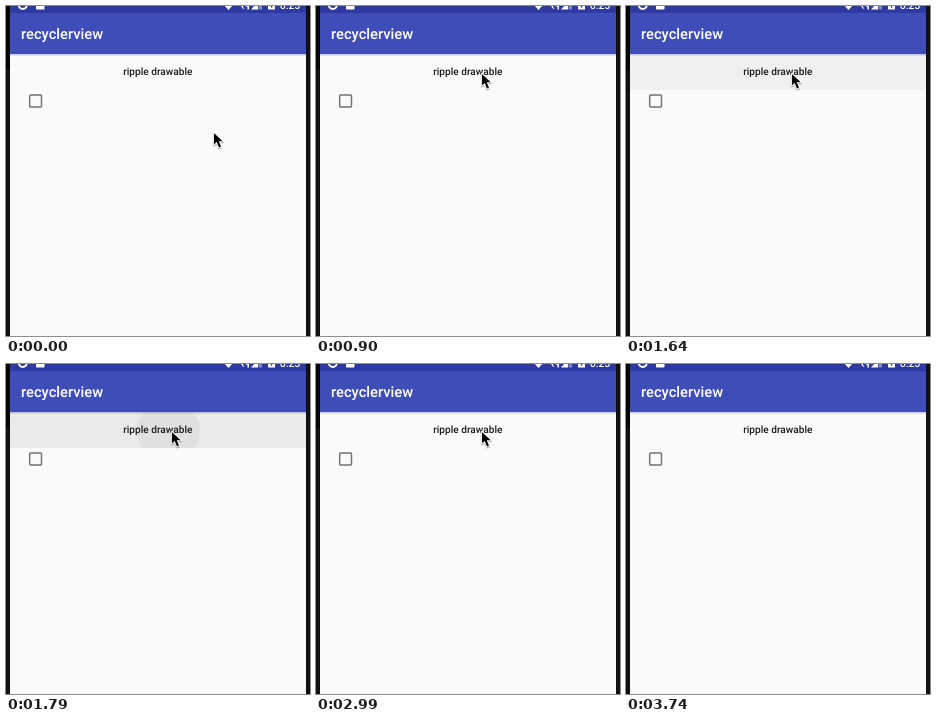
An HTML page that plays this animation: 304 by 330 pixels, repeating every 3890 ms.

```html
<!DOCTYPE html>
<html lang="en">
<head>
<meta charset="utf-8">
<title>Ripple drawable</title>
<style>
  html, body { margin: 0; width: 100%; height: 100%; overflow: hidden; background: #fafafa; }
  svg { display: block; width: 304px; height: 330px; }
  text { font-family: Roboto, sans-serif; font-weight: 500; text-rendering: geometricPrecision; }
  #cursor { filter: drop-shadow(0 1px .7px rgba(0, 0, 0, .35)); }
</style>
</head>
<body>
<svg viewBox="0 0 304 330">
  <defs>
    <linearGradient id="shade" x2="0" y2="1">
      <stop offset="0" stop-color="#000" stop-opacity=".22"/>
      <stop offset="1" stop-color="#000" stop-opacity="0"/>
    </linearGradient>
    <clipPath id="rowClip"><rect x="4" y="48" width="296" height="36"/></clipPath>
  </defs>

  <rect width="304" height="330" fill="#fafafa"/>

  <g clip-path="url(#rowClip)">
    <rect id="row" x="4" y="48" width="296" height="36"/>
    <circle id="ripple" cx="162.3" cy="67"/>
  </g>
  <text x="151.8" y="69.3" font-size="10.1" text-anchor="middle" fill="#1c1c1c">ripple drawable</text>
  <rect x="23.7" y="89.1" width="11.8" height="11.8" rx=".8" fill="none" stroke="#737373" stroke-width="1.5"/>

  <rect x="4" y="48" width="296" height="2.5" fill="url(#shade)"/>
  <rect x="4" width="296" height="48" fill="#3f4db8"/>
  <rect x="4" width="296" height="7" fill="#2e3aa2"/>
  <text x="15" y="32.8" font-size="14.7" fill="#fff">recyclerview</text>

  <g fill="#fff">
    <circle cx="16.8" cy="-1" r="4" fill="none" stroke="#fff" stroke-width="2"/>
    <rect x="30" y="-4" width="8.5" height="7.5" rx=".8"/>
    <path d="M217 -2H228L222.5 4Z"/>
    <path d="M235 -2H237V1L238.5 2.8H237L235 0ZM239 0L243 -2V3.5H241.5V1Z"/>
    <path d="M245 3.5L252 -4V3.5Z"/>
    <path d="M252.6 -3H256V3.5H252.6Z" opacity=".4"/>
    <path d="M262 -4H269V3.5H262Z"/>
    <path d="M264.8 0H266.3V1.6H264.8Z" fill="#2e3aa2"/>
    <text x="273.8" y="3" font-size="10.4">6:25</text>
  </g>

  <path d="M0 0H4V330H0ZM300 0H304V330H300Z" fill="#111012"/>
  <path d="M0 0H4V64H0Z" fill="#060607"/>

  <path id="cursor" d="M1.4 2V13.6L4.2 10.9L6.5 16.4L8.5 15.6L6.2 10.2H10.2Z"
        fill="#000" stroke="#fff" stroke-width="2" stroke-linejoin="round" paint-order="stroke"/>
</svg>
<script>
  const LOOP = 3890, TICKS = 26, LEAD = 7;   // LEAD centres the tick boundaries
  const LEAVE = 22, AFTERGLOW = 3;

  // All times below are in ticks of about 150 ms.
  const taps = [
    { at: 8, hold: 1, r: 36 },
    { at: 12, hold: 2, r: 31.5 },
    { at: 21, hold: 1, r: 36 }
  ];

  const get = id => document.getElementById(id);
  const cursor = get("cursor"), row = get("row"), ripple = get("ripple");
  const easeOut = p => 1 - (1 - p) ** 2;

  function cursorAt(k) {
    if (k < 5) {                              // glide in, then pause
      const e = easeOut(Math.min(k / 2, 1));
      return [206.5 - 26.5 * e, 125 - 30 * e];
    }
    if (k < LEAVE) return [164.5, k < LEAVE - 1 ? 66 : 68];
    const n = k - LEAVE;                      // speed up out of the stage
    return [280.5, 313 + 2.5 * n + 1.5 * n * n];
  }

  // The row is tinted while held and keeps a fainter tint after release.
  function pressAt(k) {
    const tap = taps.findLast(p => p.at <= k);
    const age = tap ? k - tap.at : Infinity;
    if (!tap || age >= tap.hold + AFTERGLOW) return { tint: 0, r: 0 };
    const held = age < tap.hold;
    return { tint: tap.r / 2 * (held ? 1 : .57), r: held ? tap.r : 0 };
  }

  function draw(time) {
    const k = Math.floor((time % LOOP + LEAD) / (LOOP / TICKS)) % TICKS;
    const { tint, r } = pressAt(k);
    const v = Math.round(250 - tint);
    cursor.setAttribute("transform", `translate(${cursorAt(k)})`);
    row.setAttribute("fill", `rgb(${v},${v},${v})`);
    ripple.setAttribute("r", r);
    ripple.setAttribute("opacity", (40 - r) / 200);   // fades as it spreads
  }

  const start = performance.now();
  function tick() {
    draw(performance.now() - start);
    requestAnimationFrame(tick);
  }
  tick();
</script>
</body>
</html>
```
